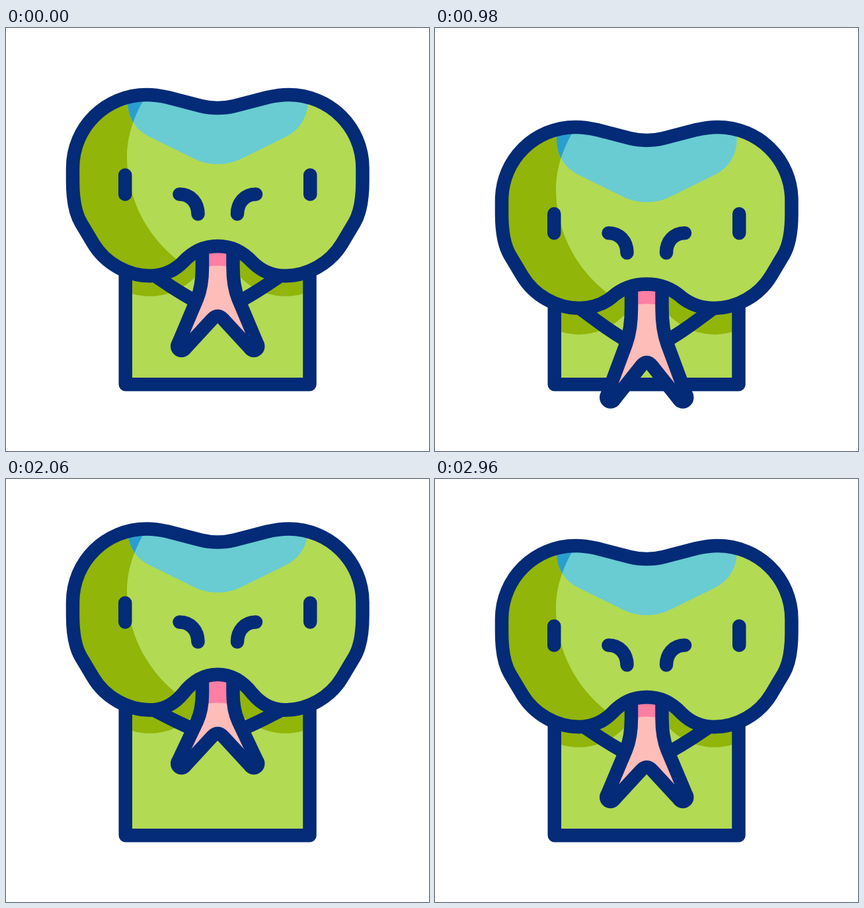
An HTML page without scripts that plays this animation: 640x640 px, repeating every 3 s.

```html
<!DOCTYPE html>
<html lang="en">
<head>
<meta charset="utf-8">
<title>Snake</title>
<style>
/* vertical offsets: head, face, tongue tip, shadow; notch stretch */
@property --head { syntax: "<number>"; inherits: true; initial-value: 0; }
@property --face { syntax: "<number>"; inherits: true; initial-value: 0; }
@property --tip { syntax: "<number>"; inherits: true; initial-value: 0; }
@property --shade { syntax: "<number>"; inherits: true; initial-value: 0; }
@property --notch { syntax: "<number>"; inherits: true; initial-value: 1; }

html, body { margin: 0; width: 100%; height: 100%; overflow: hidden; background: #fff; }
svg { display: block; width: 640px; height: 640px; animation: bob 3s infinite; }

@keyframes bob {
  0%, 6.667%, 97.333%, 100% {
    --head: 0; --face: 0; --tip: 0; --shade: 0; --notch: 1;
    animation-timing-function: cubic-bezier(.333, 0, .667, 1);
  }
  16% {
    --head: -26; --face: -35; --tip: -52; --shade: -22; --notch: 1;
    animation-timing-function: cubic-bezier(.333, 0, .667, .66);
  }
  24% {
    --head: 15.3; --face: 6.5; --tip: 16.5; --shade: 17; --notch: 1.15;
    animation-timing-function: cubic-bezier(.333, .61, .667, .79);
  }
  42.667% {
    --head: 69.6; --face: 90.7; --tip: 115; --shade: 83; --notch: 1.16;
    animation-timing-function: cubic-bezier(.333, .51, .667, 1);
  }
  52% {
    --head: 80; --face: 106; --tip: 132.5; --shade: 95; --notch: 1.16;
    animation-timing-function: cubic-bezier(.333, 0, .667, .1);
  }
  57.333% {
    --head: 77; --face: 102.7; --tip: 129; --shade: 92; --notch: 1.15;
    animation-timing-function: cubic-bezier(.333, .13, .667, .47);
  }
  60.667% {
    --head: 57.5; --face: 72; --tip: 83; --shade: 70; --notch: 1.12;
    animation-timing-function: cubic-bezier(.333, .31, .667, 1);
  }
  68.667% {
    --head: -25.5; --face: -35; --tip: -51; --shade: -21; --notch: 1;
    animation-timing-function: cubic-bezier(.333, 0, .667, 1);
  }
  78.667% {
    --head: 6.7; --face: 6.7; --tip: -1; --shade: 15; --notch: 1.02;
    animation-timing-function: cubic-bezier(.333, 0, .667, 1);
  }
}

svg {
  --mouth: calc(var(--face) * .98);
  --hinge: calc((var(--head) + var(--shade)) / 2);
}
.head { transform: translateY(calc(var(--head) * 1px)); }
.face { transform: translateY(calc(var(--face) * 1px)); }
.cap { transform: translateY(calc(var(--mouth) * 1px)); }
.tip { transform: translateY(calc(var(--tip) * 1px)); }
.shade { transform: translateY(calc(var(--shade) * 1px)); }
.arch {
  transform-origin: 0 375px;
  transform: translateY(calc(var(--head) * 1px)) scaleY(calc(1 + (var(--head) - var(--mouth)) / 45));
}
.jaw {
  transform-origin: 0 370px;
  transform: translateY(calc(var(--hinge) * 1px)) scaleY(calc(1 + (var(--face) - var(--hinge)) / 50));
}
.tongue {
  transform-origin: 0 330px;
  transform: translateY(calc(var(--mouth) * 1px)) scaleY(calc(1 + (var(--tip) - var(--mouth)) / 149.3));
}
.notch {
  transform-origin: 0 484px;
  transform: translateY(calc(var(--tip) * 1px)) scaleY(var(--notch));
}
.arch, .jaw, .tongue, .notch { vector-effect: non-scaling-stroke; }
.line { fill: none; stroke: #032b77; stroke-width: 20.5px; stroke-linecap: round; stroke-linejoin: round; }
</style>
</head>
<body>
<svg viewBox="0 0 640 640" xmlns="http://www.w3.org/2000/svg">
  <defs>
    <path id="skull" class="head" d="M218 375C184 375 150 356 132 326L113.500 295C104.500 280 101 258 101 232V212C101 150 151 101 213 101C226 101 236 103 245 105L295 118C303 120 312 121 320.250 121S337.500 120 345.500 118L395.500 105C404.500 103 414.500 101 427.500 101C489.500 101 539.500 150 539.500 212V232C539.500 258 536 280 527 295L508.500 326C490.500 356 456.500 375 422.500 375"/>
    <path id="arch" class="arch" d="M218 375C240 375 256 366 268 354C280 341 296 330 320.250 330S360.500 341 372.500 354C384.500 366 400.500 375 422.500 375"/>
    <path id="tongue" class="tongue" d="M259.800 479.300L289 410C294 398 297 385 297 362V330H343.500V362C343.500 385 346.500 398 351.500 410L380.700 479.300"/>
    <path id="notch" class="notch" d="M269.800 486.200L312 440.500Q320.250 431.500 328.500 440.500L370.700 486.200"/>
    <path id="cap" class="cap" d="M184 -20V112C184 134 196 154 216 164L283 197C306 209 334.500 209 357.500 197L424.500 164C444.500 154 456.500 134 456.500 112V-20Z"/>
    <path id="side" class="head" d="M220 90C196 125 183 160 183 195C183 255 210 315 267 357L300 380V400H80V80Z"/>
    <path id="jaw" class="jaw" d="M218 370C240 384 264 403 300 420"/>
    <path id="eye" d="M180.250 222.500V251.500M262.500 251.500C279 251.500 290.500 264 290.500 281.500"/>
    <clipPath id="sideClip"><use href="#side"/></clipPath>
    <mask id="headMask" maskUnits="userSpaceOnUse" x="0" y="0" width="640" height="640">
      <use href="#skull" fill="#fff"/>
      <use href="#arch" fill="#000"/>
      <!-- hides the seam along the closing chord -->
      <path class="head" d="M228 375H412.500" stroke="#000" stroke-width="4"/>
    </mask>
    <mask id="tongueMask" maskUnits="userSpaceOnUse" x="0" y="0" width="640" height="640">
      <rect width="640" height="640" fill="#fff"/>
      <use href="#notch" fill="#000"/>
    </mask>
  </defs>

  <!-- body -->
  <rect x="181" y="290" width="278.500" height="249" fill="#b2da53"/>
  <path class="shade" fill="#91b508" d="M181 398C205 410 252 412 287 376C300 363 340.500 363 353.500 376C388.500 412 435.500 410 459.500 398V290H181Z"/>
  <g class="line">
    <path d="M180.750 300V539.250H459.500V300"/>
    <use href="#jaw"/>
    <use href="#jaw" transform="matrix(-1 0 0 1 640.500 0)"/>
  </g>

  <!-- tongue -->
  <g mask="url(#tongueMask)">
    <use href="#tongue" fill="#ffbdb9"/>
  </g>
  <path class="shade" fill="#ff7ea3" d="M297 290V362Q320.250 357 343.500 362V290Z"/>
  <g class="line">
    <use href="#tongue"/>
    <use href="#notch"/>
  </g>
  <g class="tip" fill="#032b77">
    <circle cx="265.500" cy="481.700" r="16.500"/>
    <circle cx="375" cy="481.700" r="16.500"/>
  </g>

  <!-- head -->
  <g mask="url(#headMask)">
    <use href="#skull" fill="#b2da53"/>
    <use href="#side" fill="#91b508"/>
    <use href="#cap" fill="#68ccd2"/>
    <g clip-path="url(#sideClip)"><use href="#cap" fill="#2a9fcf"/></g>
  </g>
  <g class="line">
    <use href="#skull"/>
    <use href="#arch"/>
    <g class="face">
      <use href="#eye"/>
      <use href="#eye" transform="matrix(-1 0 0 1 640.500 0)"/>
    </g>
  </g>
</svg>
</body>
</html>
```
